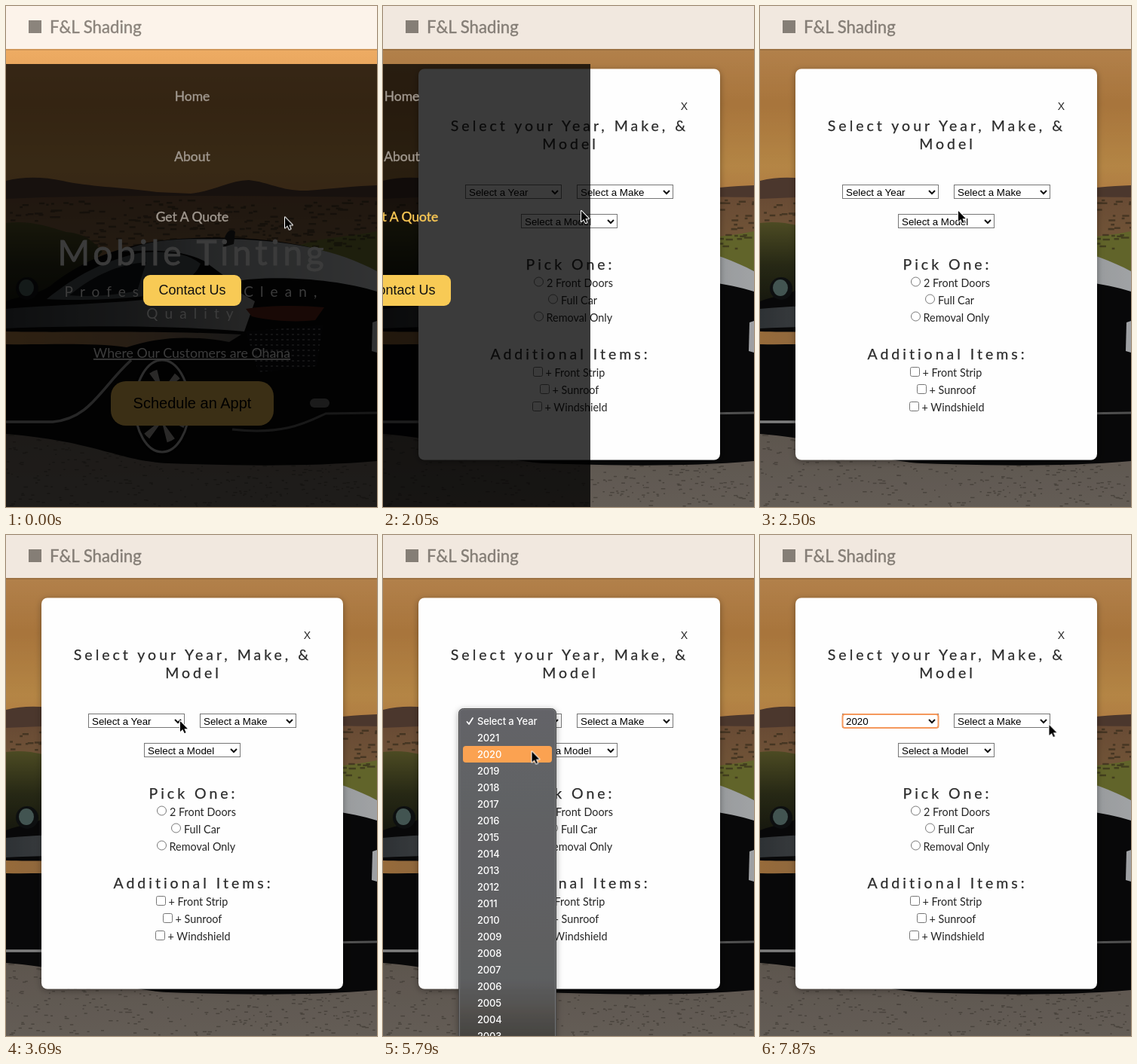
These frames come from a looping animation (492 px wide and 665 px high, 8000 ms). An HTML page:

```html
<!DOCTYPE html>
<html lang="en">
<head>
<meta charset="utf-8">
<title>Booking form</title>
<style>
html, body { margin: 0; width: 100%; height: 100%; overflow: hidden; background: #111; }
svg { display: block; width: 100vw; height: 100vh; }
text { font-family: Lato, "Open Sans", sans-serif; white-space: pre; }
.mid { text-anchor: middle; }
.ui { font-family: "Liberation Sans", Arial, sans-serif; }
.head { font-size: 19.5px; letter-spacing: 4px; fill: #2c2c2c; stroke: #2c2c2c; stroke-width: .25; text-anchor: middle; }
.label { font-size: 14.4px; fill: #262626; }
.nav { font-size: 17.5px; fill: #a0988f; stroke: #a0988f; stroke-width: .4; text-anchor: middle; }
.hero { fill: #fff; text-anchor: middle; }
.pick { font-size: 13.33px; }
.list { font: 500 13px Inter, "Open Sans", sans-serif; letter-spacing: -.15px; fill: #fff; }

/* 5 ms lead keeps every switch safely ahead of its nominal time */
.cursor, .arrow, .hand, .menu, .quote, .booking, .popup, .bar, .empty, .chosen {
  animation: 8s step-end -5ms infinite;
}
.cursor { animation-name: cursor; }
.arrow { animation-name: arrow; }
.hand { animation-name: hand; }
.menu { animation-name: menu; }
.quote { animation-name: quote; }
.booking { animation-name: booking; }
.popup { animation-name: popup; }
.bar { animation-name: bar; }
.empty { animation-name: empty; }
.chosen { animation-name: chosen; }

@keyframes cursor {
  0% { transform: translate(370px, 280.5px); }
  1.875% { transform: translate(394px, 270.5px); }
  5.5% { transform: translate(391px, 270.5px); }
  7.375% { transform: translate(388px, 270.5px); }
  12.875% { transform: translate(340px, 271px); }
  14.75% { transform: translate(275px, 273px); }
  16.5% { transform: translate(263px, 273px); }
  25.625% { transform: translate(263px, 272px); }
  42.375% { transform: translate(255px, 265px); }
  44.25% { transform: translate(242px, 255px); }
  46.125% { transform: translate(231px, 247px); }
  48% { transform: translate(227.5px, 244.5px); }
  66.75% { transform: translate(225px, 252px); }
  68.625% { transform: translate(217px, 268px); }
  70.5% { transform: translate(206px, 281px); }
  72.375% { transform: translate(197.5px, 287.5px); }
  91% { transform: translate(300px, 316px); }
  92.75% { transform: translate(379px, 329px); }
  96.5% { transform: translate(382px, 280px); }
  98.375%, 100% { transform: translate(383.5px, 252px); }
}
@keyframes arrow {
  0%, 25.625%, 100% { opacity: 1; }
  14.75% { opacity: 0; }
}
@keyframes hand {
  0%, 25.625%, 100% { opacity: 0; }
  14.75% { opacity: 1; }
}
@keyframes quote {
  0%, 31.25%, 100% { fill: #a0988f; stroke: #a0988f; }
  14.75%, 25.625% { fill: #fbc955; stroke: #fbc955; }
  23.875% { fill: #ef920f; stroke: #ef920f; }
}
@keyframes menu {
  0% { transform: translate(0, 0); }
  25.625% { transform: translate(-222px, 0); }
  27.5% { transform: translate(-422px, 0); }
  29.375% { transform: translate(-490px, 0); }
  31.25%, 100% { transform: translate(-600px, 0); }
}
@keyframes booking {
  0% { opacity: 0; }
  25.625%, 100% { opacity: 1; }
}
@keyframes popup {
  0%, 83.5%, 100% { opacity: 0; }
  53.625% { opacity: 1; }
  81.625% { opacity: .5; }
}
@keyframes bar {
  0% { transform: translate(0, 0); opacity: 1; }
  68.625% { transform: translate(0, 22px); opacity: 1; }
  70.5%, 79.875%, 100% { transform: translate(0, 44px); opacity: 1; }
  78% { transform: translate(0, 44px); opacity: 0; }
}
@keyframes empty {
  0% { opacity: 1; }
  81.625%, 100% { opacity: 0; }
}
@keyframes chosen {
  0% { opacity: 0; }
  81.625%, 100% { opacity: 1; }
}
</style>
</head>
<body>
<svg viewBox="0 0 492 665">
  <defs>
    <linearGradient id="sky" x2="0" y2="1">
      <stop offset="0" stop-color="#eeac64"/>
      <stop offset=".35" stop-color="#e09c50"/>
      <stop offset=".75" stop-color="#f0b25c"/>
      <stop offset="1" stop-color="#e9a058"/>
    </linearGradient>
    <linearGradient id="sand" x2="0" y2="1">
      <stop offset="0" stop-color="#8c6446"/>
      <stop offset="1" stop-color="#a07c4e"/>
    </linearGradient>
    <linearGradient id="bush" x2="0" y2="1">
      <stop offset="0" stop-color="#66642f"/>
      <stop offset=".5" stop-color="#34361c"/>
      <stop offset="1" stop-color="#1b1d12"/>
    </linearGradient>
    <linearGradient id="road" x2="0" y2="1">
      <stop offset="0" stop-color="#7b7066"/>
      <stop offset="1" stop-color="#857c73"/>
    </linearGradient>
    <linearGradient id="roof">
      <stop offset="0" stop-color="#5b6064"/>
      <stop offset=".35" stop-color="#a4a9ac"/>
      <stop offset="1" stop-color="#d6d9dc"/>
    </linearGradient>
    <linearGradient id="flank">
      <stop offset="0" stop-color="#3d4246"/>
      <stop offset=".5" stop-color="#686b6e"/>
      <stop offset="1" stop-color="#a5a5a5"/>
    </linearGradient>
    <linearGradient id="glow">
      <stop offset="0" stop-color="#c98f4e"/>
      <stop offset=".55" stop-color="#a9805a"/>
      <stop offset="1" stop-color="#6a6866"/>
    </linearGradient>
    <linearGradient id="panel" x2="0" y2="1">
      <stop offset="0" stop-color="#636467"/>
      <stop offset=".78" stop-color="#5d5e60"/>
      <stop offset=".88" stop-color="#514f4c"/>
      <stop offset="1" stop-color="#3c3a36"/>
    </linearGradient>
    <pattern id="mesh" width="7" height="7" patternUnits="userSpaceOnUse">
      <path fill="#101112" d="M0 0H7V7H0Z"/>
      <path fill="#56585a" d="M1 1H4V3H1Z"/>
    </pattern>
    <filter id="soft" x="-20%" y="-10%" width="140%" height="120%">
      <feDropShadow dx="0" dy="2" stdDeviation="4" flood-opacity=".35"/>
    </filter>
    <path id="chevron" d="M-4 -2L0 2 4 -2" fill="none" stroke="#111" stroke-width="2"/>
  </defs>

  <!-- desert road at sunset -->
  <g>
    <path fill="url(#sky)" d="M0 57H492V265H0Z"/>
    <path fill="#654a3c" d="M0 232C25 226 50 227 75 232C110 240 150 240 200 247L245 249C275 246 295 232 322 231C350 234 365 246 400 245C435 242 465 239 492 238V275H0Z"/>
    <path fill="url(#sand)" d="M0 256C120 250 350 252 492 254V360H0Z"/>
    <path fill="#828638" d="M380 322C410 306 450 308 492 299V360H380Z"/>
    <path id="scrub" fill="none" stroke="#3c321f" stroke-width="2.5" opacity=".6"/>
    <path fill="url(#bush)" d="M0 288C30 284 55 292 80 300C105 302 115 312 128 326L60 400H0Z"/>
    <path fill="url(#road)" d="M0 545H492V665H0Z"/>
    <path id="gravel" fill="none" stroke="#4d463f" stroke-width="1.5" opacity=".6"/>
    <path fill="#0b0b0c" d="M0 392C20 384 40 384 58 372C100 338 160 310 250 308C360 304 430 322 492 352V604C400 612 300 610 215 607C150 604 120 578 0 568Z"/>
    <path fill="url(#roof)" d="M150 326C190 310 230 309 270 309C370 308 440 324 492 352V379C440 362 350 356 300 366L262 338C230 322 190 324 150 326Z"/>
    <path fill="#555c60" d="M54 389C92 358 130 338 176 328C214 324 240 328 258 342C250 362 222 380 176 386C130 390 90 391 54 389Z"/>
    <path fill="#15181a" d="M84 384C118 356 150 343 186 340L174 378C140 385 110 386 84 384Z"/>
    <path fill="url(#flank)" d="M0 402C90 394 200 396 296 372L330 392 316 432C230 424 90 424 0 428Z"/>
    <path fill="url(#glow)" d="M0 432C70 434 190 430 312 436L296 446C240 436 200 440 160 453C110 446 50 450 0 449Z"/>
    <path fill="#6e2a1a" d="M318 402C350 397 390 397 422 400L410 417C385 420 350 418 326 412Z"/>
    <path fill="url(#mesh)" d="M318 432L420 424 412 478 335 486Z"/>
    <path fill="none" stroke="#a8a8a8" stroke-width="3.500" d="M0 552H62C112 548 126 506 166 470"/>
    <path fill="none" stroke="#6a6a6a" stroke-width="3" d="M300 562C370 570 400 552 424 541L492 540"/>
    <ellipse cx="207" cy="531" rx="41" ry="66" fill="#050505"/>
    <ellipse cx="207" cy="531" rx="36" ry="61" fill="none" stroke="#c4c4c4" stroke-width="3"/>
    <ellipse cx="207" cy="531" rx="20" ry="34" fill="none" stroke="#b5b2ae" stroke-width="30" pathLength="40" stroke-dasharray="1.300 2.700"/>
    <rect x="403" y="521" width="26" height="12" rx="6" fill="#777"/>
    <path fill="#d3d6da" d="M486 420L492 418V460L485 458Z"/>
    <ellipse cx="28" cy="375" rx="15" ry="15" fill="#121516"/>
    <ellipse cx="27" cy="374" rx="10" ry="11" fill="#58716c"/>
    <path fill="#242424" d="M288 320L290 308C292 300 299 294 304 300L302 316Z"/>
  </g>

  <g>
    <text class="hero" x="247.5" y="344" font-size="46" letter-spacing="4.8" stroke="#fff" stroke-width=".8">Mobile Tinting</text>
    <text class="hero" x="249.5" y="386" font-size="19" letter-spacing="9.1">Professional, Clean,</text>
    <text class="hero" x="248.5" y="415" font-size="19" letter-spacing="9.1">Quality</text>
    <text class="hero" x="246.5" y="467" font-size="17.8" text-decoration="underline">Where Our Customers are Ohana</text>
    <rect x="139" y="498" width="216" height="59" rx="20" fill="#ffc95a"/>
    <text class="ui mid" x="247" y="534" font-size="20">Schedule an Appt</text>
  </g>

  <path opacity=".12" d="M0 57H492V59H0Z"/>
  <path fill="#fcf3ea" d="M0 0H492V57H0Z"/>
  <rect x="30" y="19" width="17" height="17" fill="#8b847c"/>
  <text x="58" y="36" font-size="22.2" fill="#8b847c" stroke="#8b847c" stroke-width=".4">F&amp;L Shading</text>

  <g class="booking">
    <path opacity=".045" d="M0 0H492V57H0Z"/>
    <path opacity=".25" d="M0 57H492V665H0Z"/>
    <rect x="47" y="83.5" width="400" height="519" rx="8" fill="#fefefe" filter="url(#soft)"/>
    <text class="ui mid" x="399.5" y="138" font-size="14" fill="#222">X</text>
    <text class="head" x="247.5" y="166">Select your Year, Make, &amp;</text>
    <text class="head" x="248.5" y="190">Model</text>
    <text class="head" x="248.5" y="350">Pick One:</text>
    <text class="head" x="248.5" y="469">Additional Items:</text>

    <g fill="#fff" stroke="#767676">
      <rect x="109.5" y="237.5" width="127" height="18"/>
      <rect x="257.5" y="237.5" width="127" height="18"/>
      <rect x="183.5" y="276.5" width="127" height="18"/>
    </g>
    <rect class="chosen" x="109.5" y="238" width="127" height="18" rx="3" fill="#fff" stroke="#f5985c" stroke-width="2"/>
    <use href="#chevron" x="228" y="247"/>
    <use href="#chevron" x="376" y="247"/>
    <use href="#chevron" x="302" y="286"/>
    <text class="ui pick empty" x="114" y="251.5">Select a Year</text>
    <text class="ui pick chosen" x="114" y="251.5">2020</text>
    <text class="ui pick" x="262" y="251.5">Select a Make</text>
    <text class="ui pick" x="188" y="290.5">Select a Model</text>

    <g fill="#fff" stroke="#767676">
      <circle cx="206.5" cy="366" r="6"/>
      <circle cx="225.5" cy="389" r="6"/>
      <circle cx="206.5" cy="412" r="6"/>
      <rect x="199.5" y="479.5" width="12" height="12" rx="2"/>
      <rect x="208.5" y="502.5" width="12" height="12" rx="2"/>
      <rect x="198.5" y="525.5" width="12" height="12" rx="2"/>
    </g>
    <text class="label" x="217" y="372.5">2 Front Doors</text>
    <text class="label" x="236" y="395.5">Full Car</text>
    <text class="label" x="216.5" y="418.5">Removal Only</text>
    <text class="label" x="215.5" y="491.5">+ Front Strip</text>
    <text class="label" x="224.5" y="514.5">+ Sunroof</text>
    <text class="label" x="214.5" y="537.5">+ Windshield</text>
  </g>

  <g class="menu">
    <path opacity=".77" d="M0 77H497V665H0Z"/>
    <text class="nav" x="247" y="126">Home</text>
    <text class="nav" x="247" y="206">About</text>
    <text class="nav quote" x="247" y="286">Get A Quote</text>
    <rect x="182" y="357" width="130" height="41" rx="9" fill="#f8ca55"/>
    <text class="ui mid" x="247" y="383" font-size="18" fill="#111">Contact Us</text>
  </g>

  <g class="popup">
    <rect x="100.5" y="230.5" width="129" height="460" rx="6" fill="url(#panel)" stroke="#48484a" filter="url(#soft)"/>
    <rect x="101.5" y="231.5" width="127" height="458" rx="5" fill="none" stroke="#7c7d7f" stroke-width=".8"/>
    <rect class="bar" x="106" y="236" width="118" height="22" rx="4" fill="#fba251"/>
    <path d="M111.500 248L114 251 119 243" fill="none" stroke="#fff" stroke-width="1.8" stroke-linecap="round" stroke-linejoin="round"/>
    <g id="years"></g>
  </g>

  <g class="cursor" stroke-linejoin="round">
    <path class="arrow" d="M0 0V14L3.300 10.900 5.600 16 7.600 15.200 5.400 10.200H9.900Z" fill="#000" stroke="#fff" stroke-width="2" paint-order="stroke"/>
    <path class="hand" transform="translate(-5 0)" d="M4 1.500C5 -.1 6.600 .6 6.800 2L7.300 5.500C8.400 4.800 9.300 5.200 9.600 6C10.600 5.500 11.400 5.900 11.700 6.800C12.800 6.500 13.600 7.200 13.500 8.400C13.500 11 12.600 12.500 12.200 16H5.800C4.800 13.600 2.400 11.500 1 9.600C.3 8.300 1.600 7.400 2.800 8.200L4.800 9.800Z" fill="#fff" stroke="#111"/>
  </g>
</svg>
<script>
const years = document.getElementById("years");
const rows = ["Select a Year"];
for (let year = 2021; year >= 2003; year--) rows.push(year);
rows.forEach((label, i) => {
  const row = document.createElementNS("http://www.w3.org/2000/svg", "text");
  row.setAttribute("class", "list");
  row.setAttribute("x", 125);
  row.setAttribute("y", 251.7 + 22 * i);
  row.textContent = label;
  years.append(row);
});

let seed = 7;
const random = () => (seed = seed * 16807 % 2147483647) / 2147483647;

// Scatter short strokes over a band of ground
function scatter(id, count, top, bottom, length) {
  let d = "";
  for (let i = 0; i < count; i++) {
    const x = random() * 492, y = top + random() * (bottom - top);
    d += `M${x.toFixed(1)} ${y.toFixed(1)}h${(length * (.4 + random())).toFixed(1)}`;
  }
  document.getElementById(id).setAttribute("d", d);
}
scatter("scrub", 260, 258, 325, 8);
scatter("gravel", 420, 566, 665, 4);
</script>
</body>
</html>
```
